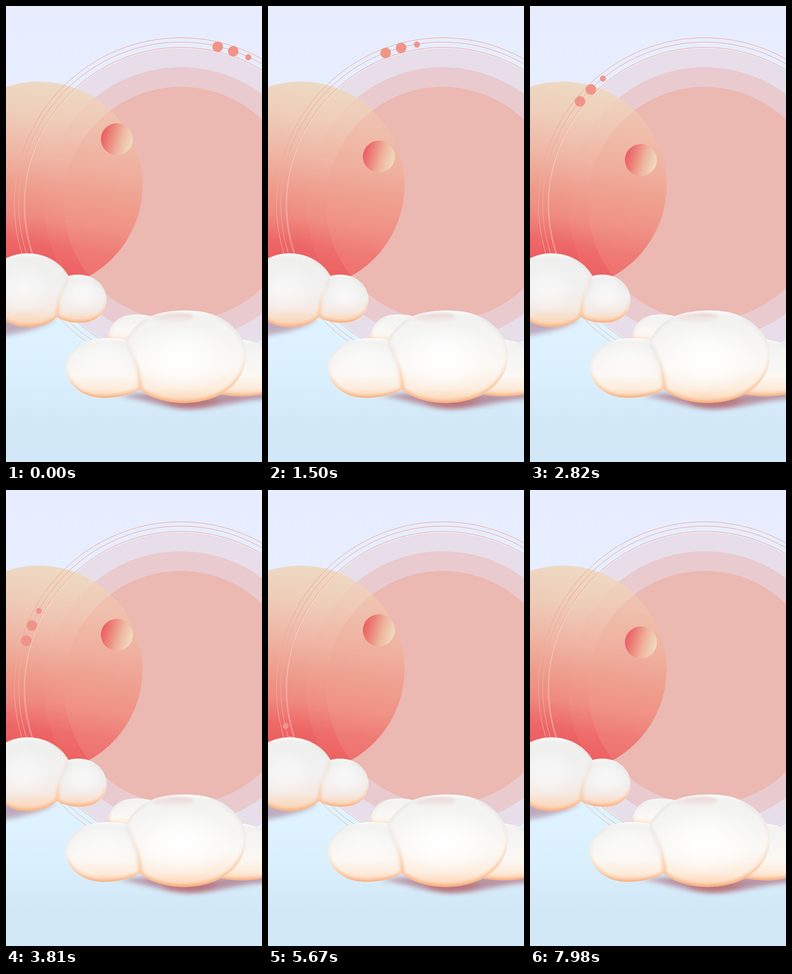
Recreate the animation shown at these times as an HTML page. Size 561 px wide and 998 px high, loop 8000 ms.

```html
<!DOCTYPE html>
<html lang="en">
<head>
<meta charset="utf-8">
<title>Clouds and circles</title>
<style>
  html, body { margin: 0; width: 100%; height: 100%; overflow: hidden; background: #e6edfe; }
  svg { display: block; width: 100vw; height: 100vh; }
</style>
</head>
<body>
<svg viewBox="0 0 561 998" preserveAspectRatio="none">
  <defs>
    <linearGradient id="sky" x2="0" y2="1">
      <stop offset="0" stop-color="#e7edfe"/>
      <stop offset=".5" stop-color="#e6effe"/>
      <stop offset=".72" stop-color="#def3ff"/>
      <stop offset=".81" stop-color="#dbf0fd"/>
      <stop offset=".92" stop-color="#d2e8f7"/>
      <stop offset="1" stop-color="#d3e8f6"/>
    </linearGradient>
    <linearGradient id="sun" x1=".58" y1="0" x2=".42" y2="1">
      <stop offset="0" stop-color="#eedac4"/>
      <stop offset=".18" stop-color="#eecdb9"/>
      <stop offset=".37" stop-color="#efb5a4"/>
      <stop offset=".52" stop-color="#ee9d8c"/>
      <stop offset=".65" stop-color="#ef8a80"/>
      <stop offset=".78" stop-color="#ed6767"/>
      <stop offset=".9" stop-color="#ec595c"/>
    </linearGradient>
    <linearGradient id="ball" x1="0" y1=".36" x2="1" y2=".64">
      <stop offset="0" stop-color="#ea5a60"/>
      <stop offset=".25" stop-color="#ed7d75"/>
      <stop offset=".6" stop-color="#eeb49d"/>
      <stop offset="1" stop-color="#efdec2"/>
    </linearGradient>
    <linearGradient id="line" gradientUnits="userSpaceOnUse" x1="0" y1="200" x2="0" y2="700">
      <stop offset="0" stop-color="#f0988a"/>
      <stop offset=".35" stop-color="#f2ada0"/>
      <stop offset=".75" stop-color="#f5b9b0"/>
      <stop offset="1" stop-color="#eda69f"/>
    </linearGradient>
    <linearGradient id="cloud" x2="0" y2="1">
      <stop offset="0" stop-color="#f1f1f0"/>
      <stop offset=".3" stop-color="#f5f5f4"/>
      <stop offset=".62" stop-color="#fbf8f4"/>
      <stop offset=".85" stop-color="#fdecdc"/>
      <stop offset="1" stop-color="#fcd3b0"/>
    </linearGradient>
    <linearGradient id="dimCloud" x2="0" y2="1">
      <stop offset="0" stop-color="#efefee"/>
      <stop offset=".5" stop-color="#f2f1f1"/>
      <stop offset=".75" stop-color="#f5eae4"/>
      <stop offset="1" stop-color="#fcd2ae"/>
    </linearGradient>
    <linearGradient id="rim" x2="0" y2="1">
      <stop offset="0" stop-color="#fff"/>
      <stop offset=".12" stop-color="#e4e2e0" stop-opacity=".7"/>
      <stop offset=".5" stop-color="#f3e6da" stop-opacity=".6"/>
      <stop offset=".8" stop-color="#fcc79f"/>
      <stop offset="1" stop-color="#f9a878"/>
    </linearGradient>
    <radialGradient id="glow">
      <stop offset="0" stop-color="#fff"/>
      <stop offset=".4" stop-color="#fff" stop-opacity=".8"/>
      <stop offset="1" stop-color="#fff" stop-opacity="0"/>
    </radialGradient>
    <linearGradient id="blush" x2="0" y2="1">
      <stop offset="0" stop-color="#e3bcb8" stop-opacity=".75"/>
      <stop offset="1" stop-color="#eedfda" stop-opacity=".2"/>
    </linearGradient>
    <filter id="soft" x="-20%" y="-60%" width="140%" height="220%"><feGaussianBlur stdDeviation="3"/></filter>
    <filter id="shade" x="-20%" y="-100%" width="140%" height="300%"><feGaussianBlur stdDeviation="6"/></filter>
    <clipPath id="sunClip"><circle cx="72" cy="392.5" r="227"/></clipPath>
  </defs>

  <rect width="561" height="998" fill="url(#sky)"/>
  <g id="discs"></g>
  <circle cx="72" cy="392.5" r="227" fill="url(#sun)"/>
  <g clip-path="url(#sunClip)">
    <circle cx="383" cy="434" r="299" fill="#f0a596" opacity=".1"/>
    <circle cx="383" cy="433" r="256" fill="#f0a090" opacity=".25"/>
  </g>
  <g id="rings" fill="none"></g>
  <g id="dots" fill="#f09488"></g>
  <circle id="bob" cx="243" r="35" fill="url(#ball)"/>
  <g id="clouds"></g>
</svg>
<script>
const el = id => document.getElementById(id);
const circle = (x, y, r, attrs = '') => `<circle cx="${x}" cy="${y}" r="${r}" ${attrs}/>`;

const CX = 383, CY = 434, ORBIT = 354.2;

el('discs').innerHTML =
  circle(CX, CY, 342, 'fill="#e7deea"') +
  circle(CX, CY - 1, 299, 'fill="#e9cacf"') +
  circle(CX, CY - 1, 256, 'fill="#ebb8b2"');

el('rings').innerHTML =
  circle(CX, CY, 342, 'stroke="#fff" stroke-opacity=".5"') +
  [364.5, 355, 343.5].map(r => circle(CX, CY, r, 'stroke="url(#line)"')).join('');

// Each dot: clockwise angle from the top in degrees, and radius
const dots = [[13.2, 11.5], [18.95, 11.5], [24.7, 6.6]];
el('dots').innerHTML = dots.map(([a, r]) =>
  circle(CX, CY - ORBIT, r, `transform="rotate(${a} ${CX} ${CY})"`)).join('');

// A puffy shape with a soft coloured rim and an optional highlight
let blobs = 0;
function blob(path, fill, rim, extra = '') {
  const id = 'blob' + blobs++;
  return `<clipPath id="${id}"><path d="${path}"/></clipPath>
    <path d="${path}" fill="url(#${fill})"/>
    <g clip-path="url(#${id})">${extra}
      <path d="${path}" fill="none" stroke="url(#rim)" stroke-width="${rim}" filter="url(#soft)"/></g>`;
}
const glow = (x, y, rx, ry, opacity) =>
  `<ellipse cx="${x}" cy="${y}" rx="${rx}" ry="${ry}" fill="url(#glow)" opacity="${opacity}"/>`;
const shadow = (path, color, opacity) =>
  `<path d="${path}" fill="${color}" opacity="${opacity}" filter="url(#shade)"/>`;

el('clouds').innerHTML =
  shadow('M-20 685H110Q70 712 -20 724Z', '#b294a8', .75) +
  blob('M137 591C152 586 175 587 190 595C212 607 222 628 220 648C218 669 206 683 185 690C162 696 134 694 112 681C114 645 125 615 137 591Z',
    'dimCloud', 8, glow(168, 630, 42, 38, .5)) +
  blob('M-40 600C-30 565 5 542 45 541.500C88 541 121 562 137 591C125 615 115 645 113 680C92 699 62 705 35 702C0 699 -35 670 -40 620Z',
    'dimCloud', 9, glow(40, 620, 60, 55, .45)) +

  shadow('M245 853C300 842 480 850 580 845V859C500 862 470 882 400 881C340 880 310 860 245 853Z', '#b07c8c', .8) +
  shadow('M340 862H470Q440 880 395 880Q360 877 340 862Z', '#b8605f', .6) +
  blob('M223 730C225 705 237 686 258 679C280 673 302 674 325 681L300 740Z', 'cloud', 6) +
  blob('M505 730C530 729 560 736 600 765V835C560 859 500 857 465 848Z', 'cloud', 8) +
  blob('M262 730C235 724 190 726 165 739C142 752 130 772 131 793C133 825 160 850 195 856C230 861 270 853 295 838C291 800 280 765 262 730Z',
    'cloud', 8, glow(215, 780, 70, 45, .5)) +
  blob('M262 733C274 708 294 687 325 676C360 664 420 663 455 676C500 693 526 728 526 767C525 800 505 830 475 847C430 876 342 878 294 840C291 800 280 765 262 733Z',
    'cloud', 10, glow(385, 772, 115, 75, .95) +
    '<ellipse cx="365" cy="680" rx="46" ry="13" fill="url(#blush)" filter="url(#soft)"/>');

// Height of the small ball over one bob cycle: [seconds, y]
const BOB_PERIOD = 5;
const bobKeys = [[0, 291.5], [.67, 307], [1.5, 329.5], [2.02, 341], [2.28, 344.5], [2.5, 344],
  [2.82, 337], [2.98, 333.5], [3.81, 317], [4.8, 293.5], [BOB_PERIOD, 291.5]];

function bobHeight(seconds) {
  const t = seconds % BOB_PERIOD;
  const i = bobKeys.findIndex(key => key[0] > t);
  const [t0, y0] = bobKeys[i - 1], [t1, y1] = bobKeys[i];
  return y0 + (y1 - y0) * (t - t0) / (t1 - t0);
}

const LOOP = 8000, STEP = 30, DEGREES_PER_SECOND = 22.6;

function draw() {
  const elapsed = performance.now() % LOOP;
  const seconds = Math.floor(elapsed / STEP) * STEP / 1000;
  el('dots').setAttribute('transform', `rotate(${-DEGREES_PER_SECOND * seconds} ${CX} ${CY})`);
  el('bob').setAttribute('cy', bobHeight(seconds));
  requestAnimationFrame(draw);
}
draw();
</script>
</body>
</html>
```
